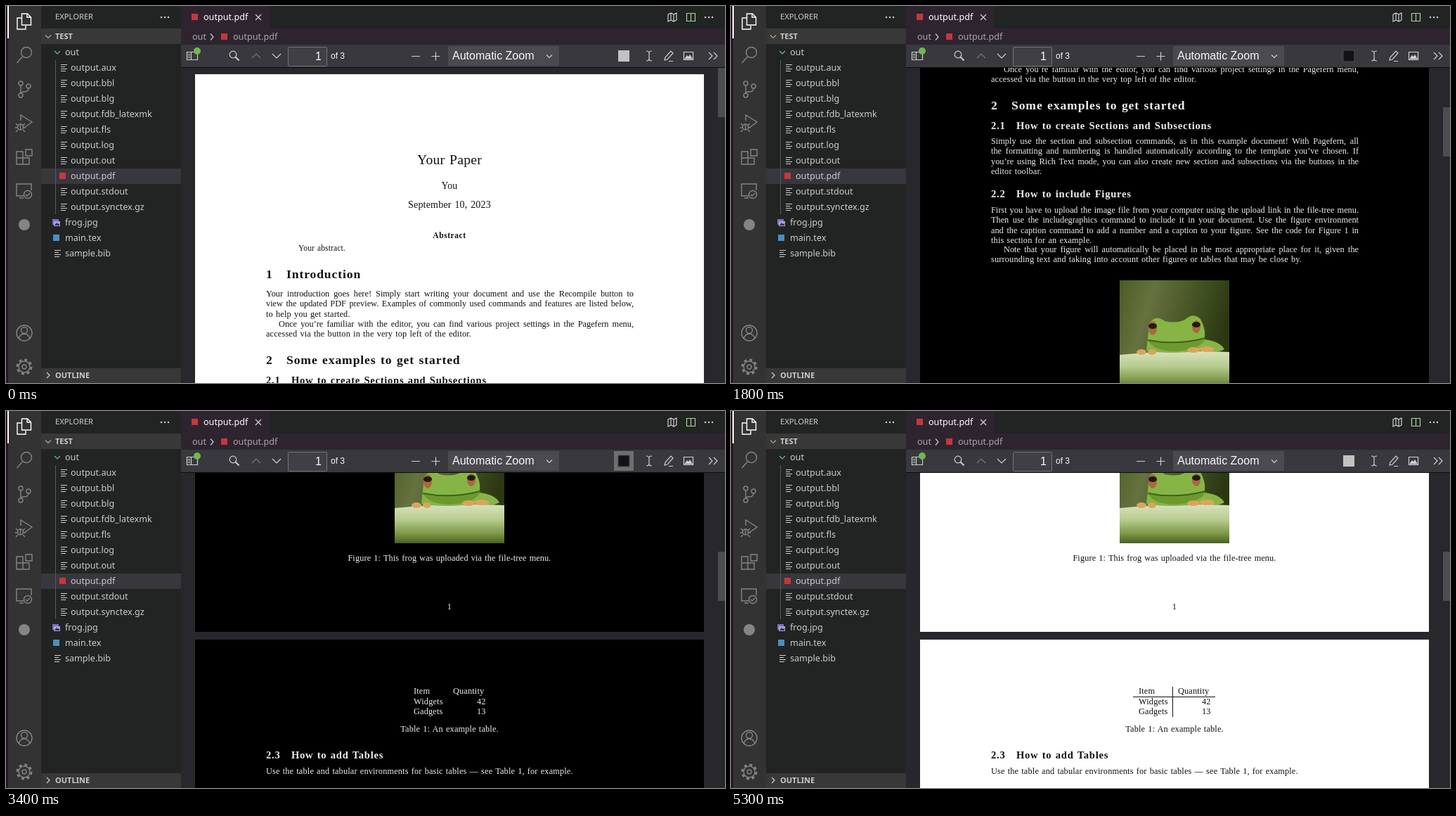
An HTML page that plays this animation: 1023 px wide and 536 px high, repeating every 5.4 s.

```html
<!DOCTYPE html>
<html lang="en">
<head>
<meta charset="utf-8">
<title>PDF preview in an editor</title>
<style>
html, body { margin: 0; width: 100%; height: 100%; overflow: hidden; background: #212422; }
#app { position: absolute; left: 0; top: 0; width: 1023px; height: 536px; overflow: hidden; }
svg { position: absolute; left: 0; top: 0; }
#chrome text { font: 12.6px "Noto Sans", "Open Sans", sans-serif; fill: #ccc; }
#chrome .head { font-size: 11.2px; }
#chrome .bold { font-size: 11px; font-weight: 700; }
#chrome .bar { font: 16px "Liberation Sans", sans-serif; fill: #f9f9fa; }
#chrome .small { font-size: 12px; }
.line { fill: none; stroke: #858585; stroke-width: 1.4; }
.thin { fill: none; stroke: #d0d0d0; stroke-width: 1.2; }
#viewer { position: absolute; left: 249px; top: 88px; width: 774px; height: 448px; overflow: hidden; background: #28282c; }
#doc { position: absolute; left: -249px; top: -88px; }
.page { position: absolute; left: 269px; width: 724px; height: 937px; background: #fff; color: #111; }
.page.dark { background: #000; color: #eee; }
.page div { position: absolute; line-height: 20px; white-space: nowrap;
  font-family: "Liberation Serif", "Noto Serif", serif; font-size: 12.3px; letter-spacing: .013em; word-spacing: .07em; }
.page .just { text-align-last: justify; letter-spacing: 0; word-spacing: 0; }
.page .mid { left: 0; width: 724px; text-align: center; }
.page .b { font-weight: 700; letter-spacing: .05em; }
.page i { position: absolute; background: #111; }
.dark i { display: none; }
#thumb { position: absolute; left: 764px; top: 0; width: 10px; height: 70px; background: #4d4d4f; }
</style>
</head>
<body>
<div id="app">
<svg id="chrome" width="1023" height="536">
  <rect width="1023" height="536" fill="#212422"/>
  <rect width="3" height="536" fill="#2e1128"/>
  <rect x="3" width="47" height="536" fill="#333"/>
  <rect x="2" width="2" height="46" fill="#fff"/>
  <path d="M50 32h199v22H50zM50 515h199v21H50z" fill="#383838"/>
  <path d="M50 231h199v22H50z" fill="#37373d"/>
  <path d="M249 0h126v32h648v23H249z" fill="#2e2430"/>
  <path d="M249 55h774v32H249z" fill="#38383d"/>
  <path d="M249 87h774v1H249z" fill="#0c0c0d"/>

  <!-- activity bar -->
  <g class="line" style="stroke:#fff">
    <path d="M22.500 11h8l5 5v11h-13zM30 11v5h5M22 17h-6v16h12v-5"/>
  </g>
  <g class="line">
    <circle cx="29" cy="66" r="7.500"/><path d="M23.500 72l-8 9"/>
    <circle cx="21" cy="110" r="3"/><circle cx="21" cy="127" r="3"/><circle cx="32" cy="114" r="3"/>
    <path d="M21 113v11M32 117q0 5-6 5q-5 0-5 2"/>
    <path d="M21 163v-8l16 10-11 8"/><circle cx="20.500" cy="172" r="4"/>
    <path d="M20.500 168v8M14 167l3 3M27 167l-3 3M13 173h4M24 173h4M14 179l3-3M27 179l-3-3"/>
    <path d="M15 207h9v18h-9zM15 216h18v9H24M28 204h9v9h-9z"/>
    <path d="M25 270H15v-17h21v9M19 273h6"/><circle cx="31" cy="268" r="5.500"/><path d="M28 268l2 2 4-4"/>
    <circle cx="26" cy="465" r="11"/><circle cx="26" cy="461" r="4.500"/><path d="M18 473q2-7 8-7t8 7"/>
    <circle cx="26" cy="513" r="8"/><circle cx="26" cy="513" r="3"/>
    <circle cx="26" cy="513" r="10" stroke-width="3" stroke-dasharray="3.900 3.950"/>
  </g>
  <circle cx="26" cy="311" r="8" fill="#858585"/>

  <!-- explorer -->
  <text class="head" x="70" y="19">EXPLORER</text>
  <text class="bold" x="70" y="47">TEST</text>
  <text class="bold" x="70" y="529">OUTLINE</text>
  <path d="M70.500 77v219" stroke="#585858"/>
  <path class="thin" style="stroke:#c5a070" d="M56 41.500l4 4 4-4"/>
  <path class="thin" style="stroke:#6fb3b8" d="M69 64l4 4 4-4"/>
  <path class="thin" d="M58 521l4 4-4 4"/>
  <g id="files"></g>
  <g fill="#d0d0d0"><circle cx="221" cy="16" r="1.200"/><circle cx="226" cy="16" r="1.200"/><circle cx="231" cy="16" r="1.200"/>
  <circle cx="995" cy="16" r="1.200"/><circle cx="1000" cy="16" r="1.200"/><circle cx="1005" cy="16" r="1.200"/></g>

  <!-- tab and breadcrumb -->
  <path d="M264 11h9v9h-9zM306 39h9v9h-9z" fill="#c4383c"/>
  <text x="281" y="20" style="fill:#fff">output.pdf</text>
  <text x="265" y="48" style="fill:#a9a5a9">out</text>
  <text x="323" y="48" style="fill:#a9a5a9">output.pdf</text>
  <g class="thin">
    <path d="M355 12l8 8M363 12l-8 8M291 39.500l4 4.500-4 4.500"/>
    <path d="M942 12l4-2 4 2 4-2v10l-4 2-4-2-4 2zM946 10v10M950 12v10"/>
    <path d="M968.500 10.500h12v11h-12zM974.500 10v12" style="stroke:#a8d0a0"/>
  </g>

  <!-- viewer toolbar -->
  <g class="thin">
    <path d="M257.500 65.500h15v11h-15zM263.500 65v12M259 68.500h3M259 71h3M259 73.500h3"/>
    <circle cx="323" cy="69" r="4.800"/><path d="M326.500 72.500l5 5" stroke-width="2"/>
    <path d="M350 74l6-6 6 6" style="stroke:#77777b"/>
    <path d="M379 68l6 6 6-6M577 71.500h12M605.500 71.500h12M611.500 65.500v12"/>
    <path d="M911 64q4 0 4 3v8q0 3-4 3M919 64q-4 0-4 3v8q0 3 4 3"/>
    <path d="M937 77l1-4 8-9 3 3-8 9zM943 78.500h6"/>
    <path d="M964.500 65.500h13v11h-13z"/><path d="M966 75l3-4 2 2 2-3 3 5z" fill="#d0d0d0"/>
    <path d="M1000 66l5 5-5 5M1007 66l5 5-5 5"/>
  </g>
  <circle cx="272" cy="64" r="5" fill="#74b650"/>
  <rect x="401.500" y="58.500" width="55" height="27" rx="1" fill="#404044" stroke="#737377"/>
  <rect x="629" y="57" width="158" height="28" fill="#4a4a4f"/>
  <path class="thin" d="M769 69.500l4 4 4-4"/>
  <text class="bar" x="449" y="77" text-anchor="end">1</text>
  <text class="bar small" x="462" y="75">of 3</text>
  <text class="bar" x="635" y="76">Automatic Zoom</text>
  <rect id="hover" x="865" y="57" width="28" height="28" fill="#6f6f71"/>
  <rect id="swatch" x="871" y="63" width="16" height="16"/>
</svg>

<div id="viewer">
  <div id="doc">
    <div class="page" id="p1" style="top:97px">
      <svg width="156" height="156" style="left:284px;top:655px">
        <defs>
          <linearGradient id="leaf" x2="1" y2=".3"><stop stop-color="#4c5c22"/><stop offset=".3" stop-color="#66723f"/><stop offset=".6" stop-color="#4b5a28"/><stop offset="1" stop-color="#2b3812"/></linearGradient>
          <linearGradient id="stem" x2="0" y2="1"><stop stop-color="#d8e2be"/><stop offset=".4" stop-color="#b7cb8e"/><stop offset=".75" stop-color="#7d9848"/><stop offset="1" stop-color="#486220"/></linearGradient>
        </defs>
        <rect width="156" height="156" fill="url(#leaf)"/>
        <path d="M0 106Q80 98 156 102V156H0z" fill="url(#stem)"/>
        <path d="M38 100Q40 82 42 62Q50 48 64 58Q80 62 93 56Q104 45 115 55Q124 72 120 84Q142 86 149 98Q140 104 118 100Q70 106 38 100z" fill="#86b545"/>
        <path d="M40 85Q80 92 122 82Q118 98 80 101Q48 101 40 85z" fill="#6c9a30"/>
        <path d="M40 85Q80 93 122 82" fill="none" stroke="#3f6218" stroke-width="2"/>
        <g fill="#a8693c"><ellipse cx="47" cy="68" rx="6" ry="10"/><ellipse cx="109" cy="66" rx="6" ry="9"/></g>
        <g fill="#221a12"><ellipse cx="47" cy="65" rx="6" ry="4"/><ellipse cx="109" cy="63" rx="6" ry="4"/></g>
        <g fill="#dba45c"><ellipse cx="31" cy="102" rx="7" ry="4"/><ellipse cx="46" cy="102" rx="6" ry="4"/><ellipse cx="105" cy="99" rx="9" ry="4"/><ellipse cx="124" cy="98" rx="11" ry="4"/></g>
      </svg>
    </div>
    <div class="page" id="p2" style="top:1045px">
      <i style="left:303px;top:81px;width:117px;height:1px"></i>
      <i style="left:359px;top:67px;width:1px;height:43px"></i>
    </div>
  </div>
  <div id="thumb"></div>
</div>
</div>

<script>
const $ = id => document.getElementById(id);

// Explorer rows
const nested = ['aux', 'bbl', 'blg', 'fdb_latexmk', 'fls', 'log', 'out', 'pdf', 'stdout', 'synctex.gz'].map(e => 'output.' + e);
const rows = ['out', ...nested, 'frog.jpg', 'main.tex', 'sample.bib'];
const icon = (name, x, y) => {
  if (name.endsWith('pdf')) return `<rect x="${x - 2}" y="${y - 5}" width="9" height="9" fill="#c4383c"/>`;
  if (name.endsWith('tex')) return `<rect x="${x - 2}" y="${y - 5}" width="9" height="9" fill="#4b8fc0"/>`;
  if (name.endsWith('jpg')) return `<path d="M${x - 3} ${y - 5}h9v8h-9z" fill="#7a6fc0"/><path d="M${x - 1} ${y - 2}h9v7h-9z" fill="#a9a0e0"/><path d="M${x} ${y + 4}l3-4 2 2 2-1v3z" fill="#343050"/>`;
  return `<path class="thin" d="M${x} ${y - 4.5}h9m-9 3h6m-6 3h9m-9 3h7"/>`;
};
$('files').innerHTML = rows.map((name, i) => {
  const y = 66 + 22 * i, deep = i > 0 && i <= nested.length;
  return (i ? icon(name, deep ? 78 : 69, y) : '') + `<text x="${deep ? 92 : 84}" y="${y + 4}">${name}</text>`;
}).join('');

// Document text, placed by its vertical centre in unscrolled stage coordinates
function put(x, y, text, cls = '', size = 12.3, width) {
  const first = y < 1040, el = document.createElement('div');
  el.className = cls;
  el.textContent = text;
  el.style.top = y - 10 - (first ? 97 : 1045) + 'px';
  if (!cls.startsWith('mid')) el.style.left = x - 269 + 'px';
  if (width) el.style.width = width + 'px';
  el.style.fontSize = size + 'px';
  $(first ? 'p1' : 'p2').append(el);
}
const centre = (y, text, size, cls = 'mid') => put(0, y, text, cls, size);
function section(y, num, title) {
  const sub = num.length > 1, size = sub ? 14.6 : 17.6;
  put(370, y, num, 'b', size);
  put(sub ? 406 : 399, y, title, 'b', size);
}
function para(y, indent, lines) {
  lines.forEach((text, i) => {
    const dx = i ? 0 : indent, last = i === lines.length - 1;
    put(370 + dx, y + 14.25 * i, text, last ? '' : 'just', 12.3, last ? 0 : 523 - dx);
  });
}

centre(218, 'Your Paper', 19.7);
centre(256, 'You', 13.8);
centre(282, 'September 10, 2023', 14.05);
centre(326, 'Abstract', 11.5, 'mid b');
put(416, 344, 'Your abstract.', '', 11.5);
section(381, '1', 'Introduction');
para(409, 0, [
  'Your introduction goes here! Simply start writing your document and use the Recompile button to',
  'view the updated PDF preview. Examples of commonly used commands and features are listed below,',
  'to help you get started.']);
para(451.7, 18, [
  'Once you’re familiar with the editor, you can find various project settings in the Pagefern menu,',
  'accessed via the button in the very top left of the editor.']);
section(503, '2', 'Some examples to get started');
section(532, '2.1', 'How to create Sections and Subsections');
para(554, 0, [
  'Simply use the section and subsection commands, as in this example document! With Pagefern, all',
  'the formatting and numbering is handled automatically according to the template you’ve chosen. If',
  'you’re using Rich Text mode, you can also create new section and subsections via the buttons in the',
  'editor toolbar.']);
section(629, '2.2', 'How to include Figures');
para(652, 0, [
  'First you have to upload the image file from your computer using the upload link in the file-tree menu.',
  'Then use the includegraphics command to include it in your document. Use the figure environment',
  'and the caption command to add a number and a caption to your figure. See the code for Figure 1 in',
  'this section for an example.']);
para(708, 18, [
  'Note that your figure will automatically be placed in the most appropriate place for it, given the',
  'surrounding text and taking into account other figures or tables that may be close by.']);
centre(929, 'Figure 1: This frog was uploaded via the file-tree menu.', 12.2);
centre(998, '1');
[['Item', 'Quantity', 636], ['Widgets', '42', 670], ['Gadgets', '13', 670]].forEach(([a, b, x], i) => {
  put(580, 1118 + 14.5 * i, a);
  put(x, 1118 + 14.5 * i, b);
});
centre(1172, 'Table 1: An example table.');
section(1209, '2.3', 'How to add Tables');
para(1232, 0, ['Use the table and tabular environments for basic tables — see Table 1, for example.']);

// Steps as [time, value]; the second page repaints slightly after the first
const scrollSteps = [[0, 0], [1400, 90], [1500, 240], [1600, 360], [1800, 362], [1900, 430], [2000, 480], [2300, 600],
  [2600, 606], [2700, 650], [2800, 690], [2900, 700], [3100, 706], [3200, 716], [3300, 720]];
const hoverSteps = [[0, 0], [700, 1], [1400, 0], [3400, 1], [4800, 0]];
const dark1 = [[0, 0], [1000, 1], [3800, 0], [4200, 1], [4600, 0]];
const dark2 = [[0, 0], [1000, 1], [3900, 0], [4300, 1], [4700, 0]];
const at = (steps, t) => steps.findLast(s => s[0] <= t)[1];

const start = performance.now();
function draw() {
  const t = Math.max(0, performance.now() - start) % 5400;
  const y = at(scrollSteps, t), dark = at(dark1, t);
  $('doc').style.transform = `translateY(${-y}px)`;
  $('thumb').style.transform = `translateY(${Math.round(y * .1556)}px)`;
  $('p1').classList.toggle('dark', !!dark);
  $('p2').classList.toggle('dark', !!at(dark2, t));
  $('hover').style.opacity = at(hoverSteps, t);
  $('swatch').style.fill = dark ? '#131313' : '#c2c2c2';
  $('swatch').style.stroke = dark ? '#4c4c4e' : 'none';
  requestAnimationFrame(draw);
}
draw();
</script>
</body>
</html>
```
